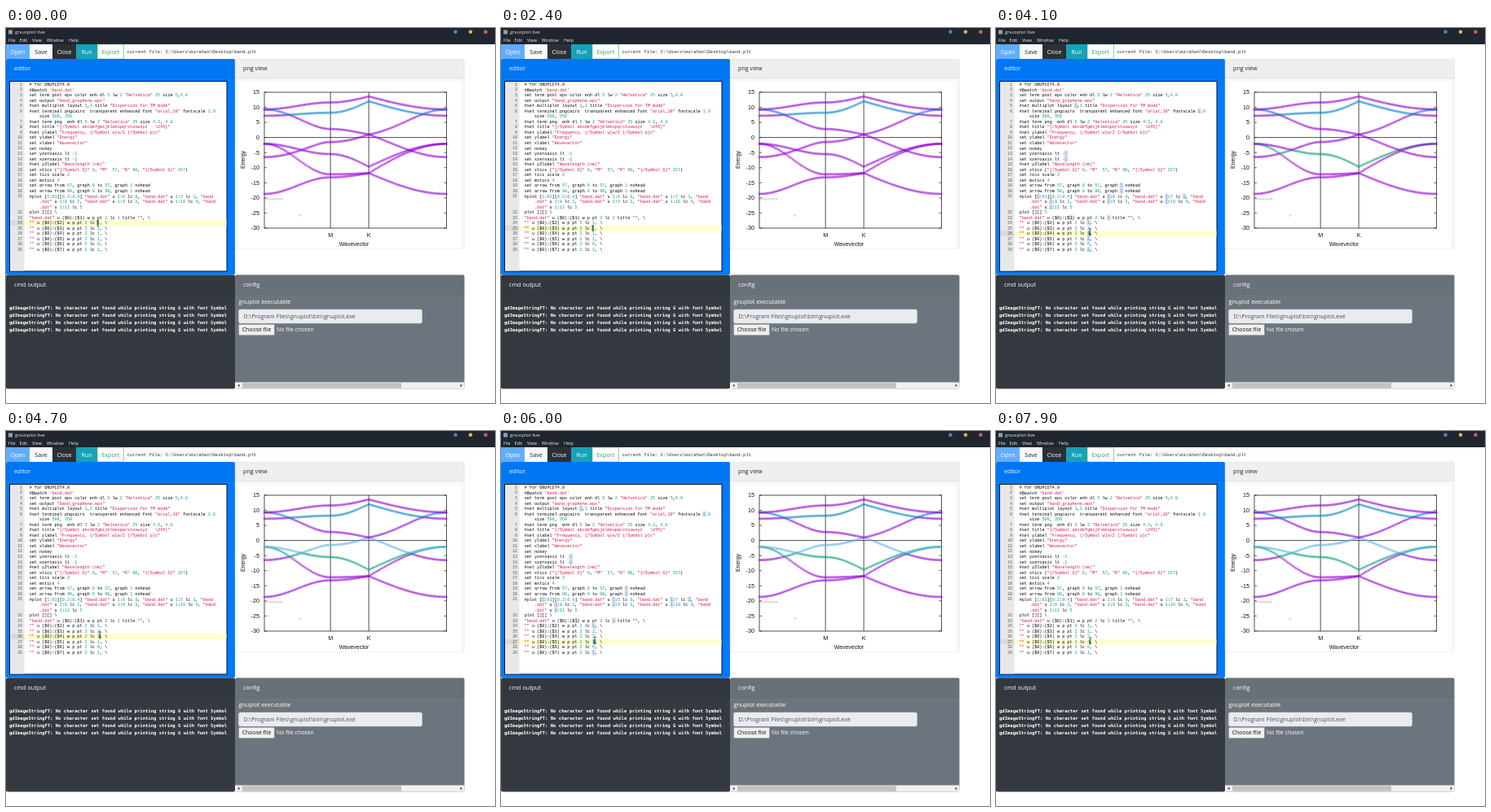
Write an HTML page that moves like this. It is 600x461 px and loops after 8 s.

```html
<!DOCTYPE html>
<html lang="en">
<head>
<meta charset="utf-8">
<title>gnuoplot live</title>
<style>
html, body { margin: 0; width: 100%; height: 100%; overflow: hidden; background: #fff; }
svg { display: block; width: 600px; height: 461px; }
text { font-family: "Open Sans", "Noto Sans", sans-serif; white-space: pre; }
.mono { font-family: "Liberation Mono", monospace; }
.bold { font-family: "DejaVu Sans Mono", monospace; font-weight: bold; }
.plot { font-family: "Liberation Sans", sans-serif; }
</style>
</head>
<body>
<svg viewBox="0 0 600 461"><g id="ui"></g><g id="bands"></g><g id="code"></g></svg>
<script>
const $ = id => document.getElementById(id);
const rect = (x, y, w, h, fill, more = '') =>
  `<rect x="${x}" y="${y}" width="${w}" height="${h}" fill="${fill}" ${more}/>`;
const line = (x1, y1, x2, y2, color, w = 0.7) =>
  `<path d="M${x1} ${y1}L${x2} ${y2}" stroke="${color}" stroke-width="${w}"/>`;
// y is the middle of the text
const text = (x, y, str, size, fill, more = '') =>
  `<text x="${x}" y="${y + size * 0.34}" font-size="${size}" fill="${fill}" ${more}>${str}</text>`;
const dot = (x, color) => `<circle cx="${x}" cy="4.8" r="2.3" fill="${color}"/>`;

// Plot geometry
const K = [0, 57, 90, 157];
const px = k => 317 + k / 157 * 223.5;
const py = e => 134.6 - e * 3.711;

function panel(x, y, w, h, fill, title, color) {
  return rect(x, y, w, h, fill, 'rx="2"') + rect(x, y, w, 24, 'rgba(0,0,0,.04)') +
    line(x, y + 24, x + w, y + 24, 'rgba(0,0,0,.12)', 0.5) + text(x + 10, y + 12, title, 7.2, color);
}

function toolbar() {
  const buttons = [
    ['Open', 0, 29, '#62adff', '#fff'], ['Save', 29, 28, '#f8f9fa', '#212529'],
    ['Close', 57, 29, '#2b3036', '#fff'], ['Run', 86, 26, '#17a2b8', '#fff'],
    ['Export', 112, 32.5, '#fff', '#28a745']];
  return buttons.map(([label, x, w, bg, fg]) =>
    rect(x, 20, w, 18, bg, label == 'Export' ? 'stroke="#28a745" stroke-width=".5"' : '') +
    text(x + w / 2, 29.3, label, 7.1, fg, 'text-anchor="middle"')).join('');
}

function axes() {
  let out = rect(285, 67, 273, 204, '#fff') +
    rect(317, 79, 223.5, 167, 'none', 'stroke="#222" stroke-width=".8"') +
    line(317, py(0), 540.5, py(0), '#222', 0.8);
  for (let e = 15; e >= -30; e -= 5)
    out += line(317, py(e), 320, py(e), '#222') + line(537.5, py(e), 540.5, py(e), '#222') +
      text(311, py(e), e, 7.2, '#111', 'class="plot" text-anchor="end"');
  [['M', 57], ['K', 90]].forEach(([label, k]) => {
    out += line(px(k), 79, px(k), 246, '#222', 0.8) +
      text(px(k), 254.3, label, 7.2, '#111', 'class="plot" text-anchor="middle"');
  });
  return out + text(427, 265.3, 'Wavevector', 7, '#111', 'class="plot" text-anchor="middle"') +
    text(0, 0, 'Energy', 7, '#111', 'class="plot" text-anchor="middle" transform="translate(291 162) rotate(-90)"');
}

function interfaceParts() {
  const menu = [['File', 3], ['Edit', 16.5], ['View', 32], ['Window', 50], ['Help', 77]];
  const message = 'gdImageStringFT: No character set found while printing string G with font Symbol';
  return [
    rect(0, 0, 600, 20, '#20262f'),
    rect(3, 2.5, 5, 5, '#8ba3b5'),
    text(11, 5, 'gnuoplot live', 6.1, '#e8e8e8'),
    dot(551.5, '#5a7fc0'), dot(570, '#d9b45c'), dot(588.5, '#e0566b'),
    ...menu.map(([label, x]) => text(x, 15.3, label, 5.5, '#f0f0f0')),
    toolbar(),
    text(148.5, 28.8, String.raw`current file: C:\Users\mirahan\Desktop\band.plt`, 5.63, '#212529', 'class="mono"'),
    panel(0, 38, 281, 265.5, '#007bff', 'editor', '#fff'),
    panel(281, 38, 281.5, 233.5, '#f8f9fa', 'png view', '#212529'),
    rect(281.2, 38.2, 281, 233, 'none', 'stroke="#ddd" stroke-width=".5" rx="2"'),
    panel(0, 303.5, 281, 140, '#343a40', 'cmd output', '#fff'),
    panel(281, 303.5, 281.5, 140, '#6c757d', 'config', '#fff'),
    ...[344.5, 353.2, 362, 370.8].map(y => text(4, y, message, 5.56, '#fff', 'class="bold"')),
    text(285.5, 336.5, 'gnuplot executable', 7.2, '#fff'),
    rect(285.5, 346, 225, 17, '#e9ecef', 'rx="2" stroke="#ced4da" stroke-width=".5"'),
    text(291.5, 354.8, String.raw`D:\Program Files\gnuplot\bin\gnuplot.exe`, 7.1, '#495057'),
    rect(285.5, 364.3, 44, 13.5, '#efefef', 'rx="1" stroke="#767676" stroke-width=".5"'),
    text(307.5, 371, 'Choose file', 6.9, '#111', 'text-anchor="middle"'),
    text(332, 371, 'No file chosen', 6.9, '#fff'),
    rect(281, 435.5, 281.5, 8, '#f1f1f1'),
    rect(290, 436.3, 195, 6.4, '#c1c1c1'),
    '<path d="M286.5 437.5v4l-2.5-2zM557.5 437.5v4l2.5-2z" fill="#505050"/>',
    rect(4.5, 65.5, 266.5, 233.5, '#fff', 'stroke="#111" stroke-width="1"'),
    rect(5, 66, 17.5, 232.5, '#e8e8e8'),
    axes()
  ].join('');
}

// Energies at Gamma, M, K for the smooth bands
const levels = [[-18.7, -13.2, -11.8], [-2.1, -12.2, -11.8], [-2.1, -5.5, -9.7], [7.2, 8.2, 12], [9.3, 11.6, 13.6]];

function energies(k) {
  const part = k < K[1] ? 0 : k < K[2] ? 1 : 2;
  const u = (k - K[part]) / (K[part + 1] - K[part]);
  const ease = [(1 - Math.cos(Math.PI * u)) / 2, 1 - Math.cos(Math.PI * u / 2), Math.sin(Math.PI * u / 2)][part];
  const hop = [Math.sqrt(5 + 4 * Math.cos(Math.PI * u)), 2 * Math.cos(Math.PI / 3 * u) - 1,
    1 + 2 * Math.cos(Math.PI * 2 / 3 * (1 - u))][part];
  const smooth = levels.map(l => l[part] + (l[(part + 1) % 3] - l[part]) * ease);
  return [...smooth, 1 - 2.5 * hop, 1 + 1.317 * hop + 0.483 * hop * hop].sort((a, b) => a - b);
}

const cross = (x, y, r = 1.35) => `M${x - r} ${y - r}l${2 * r} ${2 * r}m0 ${-2 * r}l${-2 * r} ${2 * r}`;
const marks = (d, color, w = 0.55) => `<path d="${d}" fill="none" stroke="${color}" stroke-width="${w}"/>`;
const bandPaths = Array(7).fill('');
for (let k = 0; k <= 157; k++)
  energies(k).forEach((e, i) => bandPaths[i] += cross(px(k), py(e)));
let strays = cross(361, 230.5, 1.2);
for (let i = 0; i < 7; i++) strays += cross(317.5 + i * 3.4, 210.3, 1.2);

const palette = { 1: '#9400d3', 2: '#009e73', 3: '#56b4e9', 6: '#0080c8' };
const drawBands = (c3, c4) => marks(strays, '#a850cc', 0.4) +
  [1, 1, c3, c4, 1, 6, 1].map((c, i) => marks(bandPaths[i], palette[c])).join('');

const script = String.raw`# for GNUPLOT4.0
#@watch 'band.dat'
set term post eps color enh dl 5 lw 2 "Helvetica" 25 size 5,4.0
set output "band_graphene.eps"
#set multiplot layout 1,3 title "Dispersion for TM mode"
#set terminal pngcairo  transparent enhanced font "arial,10" fontscale 1.0
    size 500, 350
#set term png  enh dl 5 lw 2 "Helvetica" 25 size 4.3, 4.0
#set title "{/Symbol abcdefgmijklmnopqrstuvwxyz   \245}"
#set ylabel "Frequency, {/Symbol w}a/2 {/Symbol p}c"
set ylabel "Energy"
set xlabel "Wavevector"
set nokey
set yzeroaxis lt -1
set xzeroaxis lt -1
#set y2label "Wavelength (nm)"
set xtics ("{/Symbol G}" 0, "M"  57, "K" 90, "{/Symbol G}" 157)
set tics scale 2
set mxtics 4
set arrow from 57, graph 0 to 57, graph 1 nohead
set arrow from 90, graph 0 to 90, graph 1 nohead
#plot [1:61][0.2:0.4] "band.dat" u 1:6 lc 0, "band.dat" u 1:7 lc 1, "band
    .dat" u 1:8 lc 2, "band.dat" u 1:9 lc 3, "band.dat" u 1:10 lc 4, "band
    .dat" u 1:11 lc 5
plot [][] \
"band.dat" u ($0):($1) w p pt 2 lc 1 title "", \ `.trimEnd().split('\n');

const X0 = 28.7, CW = 3.09, ROW = 6.55;
const tokens = /(^ +\.dat"|"[^"]*(?:"|$)|'[^']*')|(?<![\w$.])-?\d+(?:\.\d+)?/g;
const paint = row => row.replace(tokens, (m, str) => `<tspan fill="${str ? '#d14' : '#099'}">${m}</tspan>`);

function drawCode([, active, caret, selected, mx, my, lc]) {
  const rows = [...script, ...[...('1' + lc + '61')].map((c, i) => `"" u ($0):($${i + 2}) w p pt 2 lc ${c}, \\`)];
  let back = '', front = '', number = 0;
  rows.forEach((row, i) => {
    const y = 69.2 + i * ROW, wrapped = row[0] == ' ';
    if (!wrapped) {
      number++;
      front += text(20, y, number, 4.9, '#555', 'class="mono" text-anchor="end"');
    }
    const current = !wrapped && number == active;
    if (current) {
      back += rect(5, y - 3.2, 17.5, ROW, '#dadada') + rect(22.5, y - 3.2, 248, ROW, '#ffffcc');
      front += line(X0 + caret * CW, y - 3.1, X0 + caret * CW, y + 3.1, '#000', 0.8);
    }
    if (selected) for (const { index } of row.matchAll(/\b1\b/g)) {
      const x = X0 + index * CW;
      back += current && index == 27 ? rect(x, y - 3.2, CW, ROW, '#b5d5ff')
        : rect(x - 0.2, y - 3, CW + 0.4, 6.1, '#f4f4ff', 'stroke="#b4b4f0" stroke-width=".6" rx=".6"');
    }
    front += text(X0, y, paint(row), 5.15, '#000', 'class="mono"');
  });
  const beam = `<path d="M${mx - 1.3} ${my - 3.4}h2.6m-1.3 0v6.8m-1.3 0h2.6" fill="none" stroke="#222" stroke-width=".6"/>`;
  return back + front + beam;
}

// time, active line, caret column, selected, pointer x, pointer y, typed colours
const steps = [
  [0, 24, 27, 0, 113, 240, '111'],
  [800, 24, 27, 0, 116, 256, '111'],
  [1700, 24, 28, 1, 115.5, 240, '111'],
  [2200, 24, 28, 0, 114, 244, '111'],
  [2400, 25, 27, 0, 113, 246, '111'],
  [2500, 25, 28, 1, 114, 246, '111'],
  [3000, 25, 28, 0, 114, 246, '211'],
  [3900, 26, 27, 0, 114, 251, '211'],
  [4100, 26, 28, 1, 115, 250, '211'],
  [4300, 26, 28, 0, 115, 250, '231'],
  [5300, 27, 27, 0, 110.5, 259, '231'],
  [5500, 27, 28, 1, 115, 257, '231'],
  [7500, 27, 28, 0, 115.5, 258, '234']
];

$('ui').innerHTML = interfaceParts();
let shownStep, shownBands;
function frame(now) {
  const t = now % 8000;
  const step = steps.findLast(s => s[0] <= t);
  const c3 = t < 3400 ? 1 : 2, c4 = t < 4700 ? 1 : 3;
  if (step != shownStep) $('code').innerHTML = drawCode(shownStep = step);
  if (c3 + c4 != shownBands) {
    shownBands = c3 + c4;
    $('bands').innerHTML = drawBands(c3, c4);
  }
  requestAnimationFrame(frame);
}
frame(performance.now());
</script>
</body>
</html>
```
